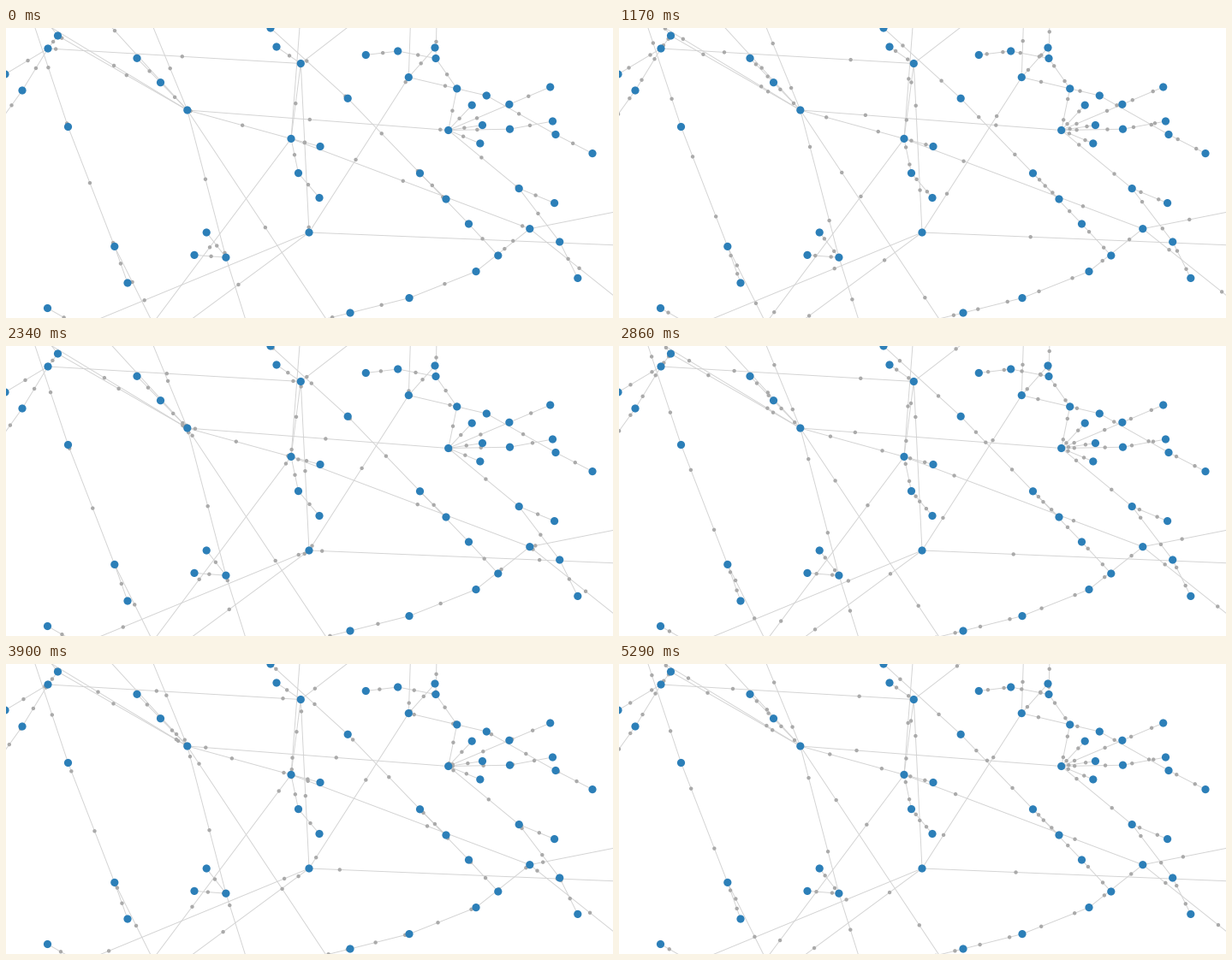
Write a matplotlib script that moves like this. It is 709 by 339 pixels and loops after 5360 ms.

```python
import matplotlib.pyplot as plt
import numpy as np
from matplotlib.animation import FuncAnimation
from matplotlib.collections import LineCollection

W, H, DPI = 709, 339, 64
PT = 72 / DPI                 # points per pixel
LOOP, TICK = 5360, 10         # ms
HALF_TRIP, LEAD = 813, .062   # ms per half link, and the phase at the start
BLUE, GREY, LINE = "#2c7fb8", "#aaaaaa", "#d3d3d3"


def place(names, *points):
    return dict(zip(names, np.array(points, float)))


def between(a, b, part):
    return node[a] + part * (node[b] - node[a])


# key points of the network on the stage
node = place(
    "ABCDEFHIJKLMNOPQRSTUVXZdefghijklmnopqrstuvwxyz",
    (60.5, 9), (49, 24), (19, 73), (-1, 54), (72.5, 115.5), (153, 35.3),
    (211.8, 96), (309, 0), (316, 22), (344.3, 41.5), (333, 129.4),
    (367, 138.5), (341.5, 169.6), (366, 198.5), (354, 239), (399.2, 82.3),
    (420.3, 31.5), (457.7, 27), (470.3, 57.6), (501, 23), (502, 35.5),
    (561.3, 79), (516.7, 119.5), (588.5, 118.2), (635.7, 69), (638.5, 109),
    (642, 124.5), (685, 146.6), (483.5, 169.8), (514, 200), (540.5, 229),
    (574.8, 266), (549, 284.6), (471, 315.6), (402, 333), (611.8, 234.7),
    (599.2, 187.6), (640.6, 204.6), (646.7, 250), (667.8, 292.4),
    (234.2, 239), (220, 265.4), (256.9, 268.2), (126.8, 255.4), (142, 298),
    (48.5, 327.5))

# neighbours beyond the stage
node |= place(
    "0123456789αβγδεζηθικ",
    (-7.6, 110), (171, 344), (-56, 408), (178, 369), (130.5, 400),
    (319, 465), (169, -8), (31, -102), (29, -15), (406, 388.5), (579, -140),
    (354.5, -151), (357.5, 344), (830, 191.5), (735, 333), (862, 260),
    (503, -6), (476, -112.5), (34, -24.6), (84.5, 348))

# nodes that sit on a straight run, and the short spokes of a hub
node["G"] = between("F", "H", .468)
node["W"] = between("T", "X", .62)
node["c"] = between("Z", "e", .598)
for name, deg in zip("Yab", (-46.8, -8.5, 22.6)):
    turn = np.radians(deg)
    node[name] = node["Z"] + 40.2 * np.array([np.cos(turn), np.sin(turn)])

# each pair flows from the first node to the second
LINKS = ("BK DB CB BA AH xE yx uw vw wH FG GH JK QI KL PK ML NL ON pL HL ZH "
         "TP iQ ji ki lk mp nm on qZ rq sq ts RS SV UT XT gX hg ec cZ YZ aZ "
         "dZ bZ fd WZ VW 0C 1x 2P 3P 4L 5w 6H 7H 8H E8 9H αK βL γo δp εp ζP "
         "ηV θT ιA zκ").split()

links = np.array([(node[a], node[b]) for a, b in LINKS])
start, span = links[:, 0], links[:, 1] - links[:, 0]
nodes = np.array(list(node.values()))

# moments when the picture steps on
STEPS = np.r_[0, 110, 260:3901:130, 4050:5221:130, 5290]


def layout(frame):
    """Positions of all dots, two per link, then all nodes."""
    now = STEPS[np.searchsorted(STEPS, frame * TICK, side="right") - 1]
    p = (LEAD + now / HALF_TRIP) % 1 / 2
    return np.vstack([start + p * span, start + (p + .5) * span, nodes])


def area(diameter):
    return (diameter * PT) ** 2


fig = plt.figure(figsize=(W / DPI, H / DPI), dpi=DPI, facecolor="white")
ax = fig.add_axes([0, 0, 1, 1])
ax.set_xlim(0, W)
ax.set_ylim(H, 0)
ax.axis("off")

ax.add_collection(LineCollection(links, colors=LINE, linewidths=.95 * PT,
                                 zorder=1), autolim=False)
n_dots, n_nodes = 2 * len(links), len(nodes)
marks = ax.scatter(*layout(0).T,
                   s=[area(4.4)] * n_dots + [area(9.2)] * n_nodes,
                   c=[GREY] * n_dots + [BLUE] * n_nodes,
                   linewidths=0, zorder=2)


def update(frame):
    marks.set_offsets(layout(frame))
    return marks,


anim = FuncAnimation(fig, update, frames=LOOP // TICK, interval=TICK,
                     init_func=lambda: update(0), repeat=True,
                     repeat_delay=0, blit=True)
plt.show()
```
